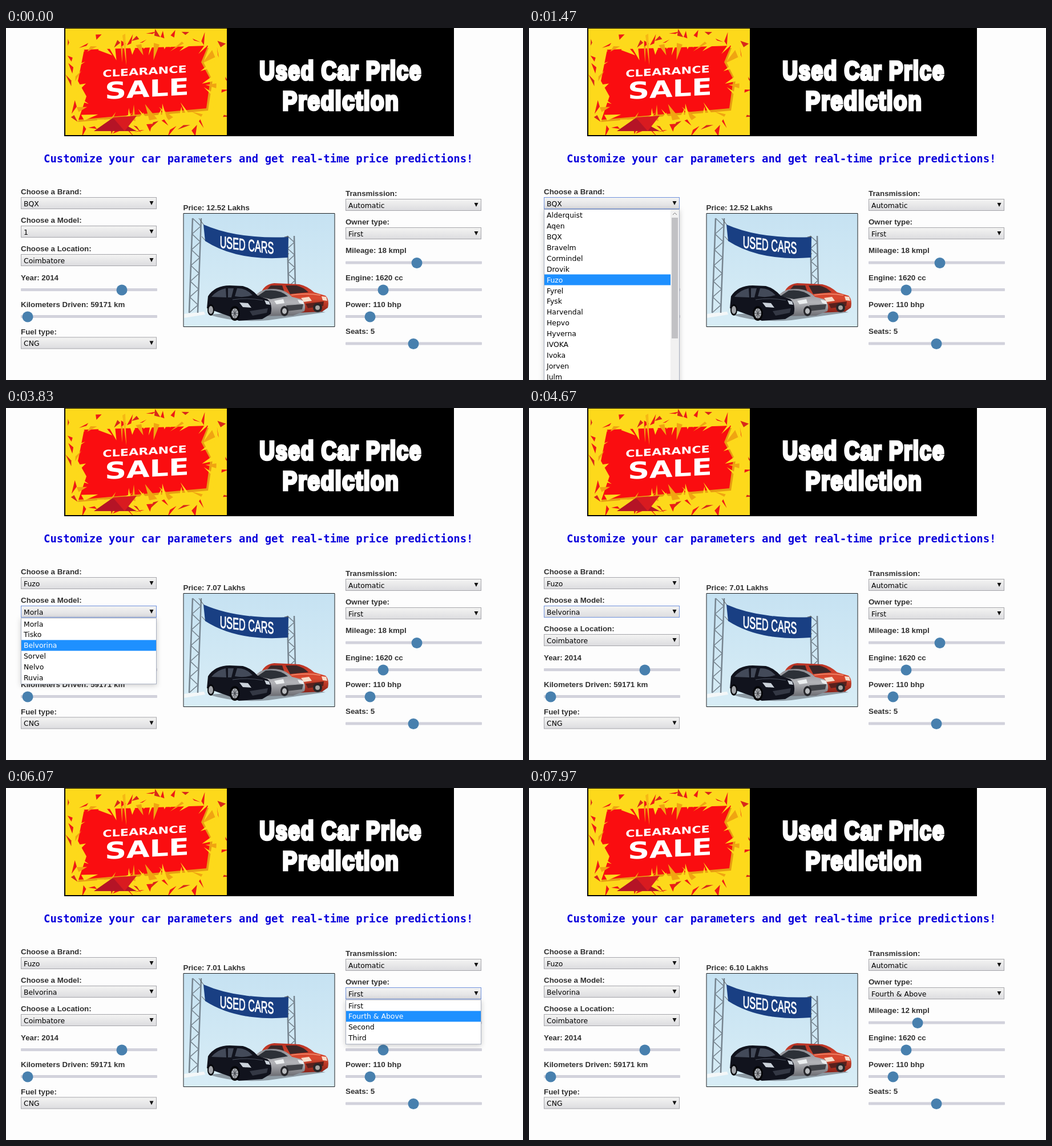
Animation, 906 px wide and 618 px high, one loop 8000 ms. Source, as an HTML page:

```html
<!DOCTYPE html>
<html lang="en">
<head>
<meta charset="utf-8">
<title>Used Car Price Prediction</title>
<style>
  html, body { margin: 0; width: 100%; height: 100%; overflow: hidden; background: #fdfdfd; }
  svg { display: block; width: 906px; height: 618px; }
  .label { font: bold 13.333px "Liberation Sans", Arial, sans-serif; fill: #303030; }
  .value { font: 12.4px "DejaVu Sans", sans-serif; fill: #000; }
  .lead { font: bold 18.96px "DejaVu Sans Mono", monospace; fill: #0a00dc; }
  .title { font: bold 47px "Liberation Sans", Arial, sans-serif; letter-spacing: 2px; fill: #fff; stroke: #fff; stroke-width: 4.5; text-anchor: middle; }
  .promo { font-family: "DejaVu Sans", sans-serif; font-weight: bold; fill: #fff; text-anchor: middle; }
  .sign { font: 29px "Liberation Sans", Arial, sans-serif; fill: #fff; stroke: #fff; text-anchor: middle; }
  .popup { filter: drop-shadow(0 2px 5px #0003); }
  .truss { fill: none; stroke: #76848f; stroke-width: 2.5; }
</style>
</head>
<body>
<svg viewBox="0 0 906 618">
  <defs>
    <linearGradient id="button" x2="0" y2="1">
      <stop stop-color="#f4f4f3"/><stop offset="1" stop-color="#dcdcdf"/>
    </linearGradient>
    <linearGradient id="sky" x2="0" y2="1">
      <stop stop-color="#c6e2f2"/><stop offset="1" stop-color="#d8edf6"/>
    </linearGradient>
    <linearGradient id="silver" x2="0" y2="1">
      <stop stop-color="#8b8c92"/><stop offset=".5" stop-color="#b4b5b9"/><stop offset="1" stop-color="#6b6c72"/>
    </linearGradient>
    <linearGradient id="red" x2="0" y2="1">
      <stop stop-color="#b83325"/><stop offset=".5" stop-color="#da4a30"/><stop offset="1" stop-color="#8a2118"/>
    </linearGradient>
    <clipPath id="promoClip"><path d="M104 1H387V188H104Z"/></clipPath>
  </defs>
  <rect width="906" height="618" fill="#fdfdfd"/>

  <path d="M102 0H785V190H102Z"/>
  <g clip-path="url(#promoClip)">
    <path d="M104 1H387V188H104Z" fill="#fdd91b"/>
    <path d="M140 41L355 35L346 60L362 92L354 145L126 165L143 122L128 95Z" fill="#e79c12"/>
    <path d="M137 38L354 31L342 60L358 90L351 141L127 161L141 120L126 93Z" fill="#fa0d10"/>
    <g id="shards" transform="rotate(-3 245 95)"></g>
    <path d="M154 181L187 158L229 181Z" fill="#b51426"/>
    <path d="M187 157L229 154L208 181Z" fill="#d91b20"/>
    <path d="M204 13L209 10L211 66Z" fill="#f6b814"/>
    <text class="promo" font-size="17" transform="matrix(1.31 -.075 0 1 243 82)">CLEARANCE</text>
    <text class="promo" font-size="41" transform="matrix(1.28 -.07 0 1 247 121)">SALE</text>
  </g>
  <g class="title">
    <text transform="translate(586.500 91) scale(.785 1)">Used Car Price</text>
    <text transform="translate(587 144) scale(.82 1)">Prediction</text>
  </g>
  <text class="lead" x="66" y="236">Customize your car parameters and get real-time price predictions!</text>

  <g>
    <path d="M311 325.500H576V524.500H311Z" fill="url(#sky)"/>
    <path d="M312 502L347 498L349 503L312 509Z" fill="#f4f7f8"/>
    <path d="M355 503Q400 518 460 513L560 499L520 492Z" fill="#8d9aa3"/>
    <g id="trusses" class="truss"></g>
    <path d="M338 334L349 349M343 366L350 374M488 367L495 366M488 400L496 396" stroke="#555" fill="none"/>
    <path d="M346 345Q405 371 495 367L494 403Q405 410 349 374Z" fill="#193f83"/>
    <text class="sign" transform="matrix(.56 .065 0 1 422 391)">USED CARS</text>

    <path d="M446 468Q451 450 470 448L514 450Q528 453 540 464L560 470Q567 477 564 491L554 498L505 500L450 492Z" fill="url(#red)"/>
    <path d="M454 463L464 452H484L488 464ZM490 452H509Q521 455 530 464L498 467Z" fill="#3b2728"/>
    <path d="M517 474L531 472L536 479L522 481ZM553 471L561 472L563 479L555 478Z" fill="#f6dcca"/>
    <path d="M525 484L557 480L556 488L529 492Z" fill="#5a201c"/>
    <path d="M500 469Q525 465 551 469" stroke="#f08062" stroke-width="2" fill="none"/>
    <ellipse cx="546" cy="491" rx="8" ry="8" fill="#292729"/>
    <ellipse cx="546" cy="491" rx="4" ry="4" fill="#a9a5a3"/>

    <path d="M436 471Q447 457 468 458Q489 458 501 472L517 476Q527 484 523 497L503 505L440 506Z" fill="url(#silver)"/>
    <path d="M440 471L455 461Q480 458 494 471L464 476Z" fill="#2c3037"/>
    <path d="M470 479L486 476L488 483L474 485ZM511 477L521 479L522 485L514 483Z" fill="#eceff0"/>
    <path d="M491 487L521 485L519 494L493 497Z" fill="#424449"/>
    <ellipse cx="488" cy="497" rx="7" ry="9" fill="#27282c"/>
    <ellipse cx="488" cy="497" rx="4" ry="5" fill="#b8bbbe"/>

    <path d="M352 492L354 471Q366 452 392 452L415 453Q430 457 441 470L458 476Q468 484 464 502L449 511L408 514L391 506Z" fill="#11131d"/>
    <path d="M360 472Q370 460 385 457L386 473ZM389 457L399 457L395 473L389 473ZM401 471L405 457Q420 456 432 469Q417 474 401 471Z" fill="#434a59"/>
    <path d="M409 482L424 483L430 491L415 490ZM453 478L461 480L463 486L456 485Z" fill="#cbd2da"/>
    <path d="M427 497L459 492L457 500L432 505Z" fill="#343844"/>
    <path d="M397 477Q422 473 450 478" stroke="#4c5361" fill="none"/>
    <ellipse cx="359" cy="495" rx="6" ry="10" fill="#050609"/>
    <ellipse cx="359" cy="495" rx="4" ry="7" fill="#a2a5aa"/>
    <ellipse cx="401" cy="501" rx="9" ry="13" fill="#050609"/>
    <ellipse cx="401" cy="501" rx="6" ry="9" fill="#b1b4b8"/>
    <path d="M401 492V510M395 501H407M397 495L405 507M405 495L397 507" stroke="#3b3d42"/>
    <path d="M311 325.500H576V524.500H311Z" fill="none" stroke="#1c2023"/>
  </g>
  <g id="form"></g>
</svg>
<script>
const LOOP = 8000;
const LEFT = 26, RIGHT = 595, WIDTH = 238, ROW = 18.93;
const BRANDS = ["Alderquist", "Aqen", "BQX", "Bravelm", "Cormindel", "Drovik", "Fuzo", "Fyrel", "Fysk",
  "Harvendal", "Hepvo", "Hyverna", "IVOKA", "Ivoka", "Jorven", "Julm"];
const MODELS = ["Morla", "Tisko", "Belvorina", "Sorvel", "Nelvo", "Ruvia"];
const OWNERS = ["First", "Fourth &amp; Above", "Second", "Third"];

// Opening and closing times of the three menus, then the slider drag.
const BRAND = [1000, 1900], MODEL = [3250, 4150], OWNER = [5600, 6450], DRAG = [7050, 7700];

const $ = id => document.getElementById(id);
const clamp = v => Math.min(1, Math.max(0, v));
const progress = (t, [from, to]) => clamp((t - from) / (to - from));
const isOpen = (t, [from, to]) => t >= from && t < to;

const text = (x, y, s, kind, fill = "") =>
  `<text class="${kind}" x="${x}" y="${y}"${fill && ` style="fill:${fill}"`}>${s}</text>`;
const rect = (x, y, w, h, attrs) => `<rect x="${x}" y="${y}" width="${w}" height="${h}" ${attrs}/>`;

function select(x, y, label, value, focused) {
  return text(x, y - 5, label, "label") +
    rect(x + .5, y + .5, WIDTH - 1, 20, `fill="url(#button)" stroke="${focused ? "#6f91dc" : "#a5a5aa"}"`) +
    text(x + 5, y + 15.5, value, "value") +
    `<path d="M${x + 225.500} ${y + 7}h7l-3.500 7z" fill="#111"/>`;
}

function slider(x, y, label, thumb) {
  return text(x, y - 17, label, "label") +
    rect(x, y - 2.5, 239, 5, 'rx="1" fill="#d2d2dc"') +
    `<circle cx="${thumb}" cy="${y + .5}" r="9.5" fill="#4880ae"/>`;
}

function popup(x, y, items, active, scrolls) {
  const rowWidth = WIDTH - (scrolls ? 17 : 2);
  const height = items.length * ROW + 2;
  let out = rect(x + .5, y + .5, WIDTH - 1, height, 'class="popup" fill="#fff" stroke="#a9b0c0"');
  items.forEach((item, i) => {
    const top = y + 1 + i * ROW;
    if (i === active) out += rect(x + 1, top, rowWidth, ROW, 'fill="#1e90ff"');
    out += text(x + 5, top + 14, item, "value", i === active ? "#fff" : "");
  });
  if (scrolls) {
    out += rect(x + 222, y + 1, 15, height, 'fill="#f1f1f1"') +
      rect(x + 224, y + 15, 11, 212, 'fill="#c1c1c4"') +
      `<path d="M${x + 226} ${y + 10}l3.500-3.500 3.500 3.500" fill="none" stroke="#777"/>`;
  }
  return out;
}

function hovered(t, [from], start, end) {
  return Math.round(start + (end - start) * progress(t, [from + 150, from + 420]));
}

function priceAt(t, mileage) {
  if (t < BRAND[1] + 150) return 12.52;
  if (t < MODEL[1] + 150) return 7.07;
  if (t < OWNER[1] + 150) return 7.01;
  return 6.10 + (mileage - 12) * .04;
}

function formAt(t) {
  const brandChosen = t >= BRAND[1], modelChosen = t >= MODEL[1];
  const drag = progress(t, DRAG);
  const mileage = Math.round(18 - 6 * drag * drag * (3 - 2 * drag));
  const model = modelChosen ? MODELS[2] : brandChosen ? MODELS[0] : "1";

  let out = select(LEFT, 297, "Choose a Brand:", BRANDS[brandChosen ? 6 : 2], isOpen(t, [BRAND[0], MODEL[0]])) +
    select(LEFT, 347, "Choose a Model:", model, isOpen(t, [MODEL[0], OWNER[0]])) +
    select(LEFT, 397, "Choose a Location:", "Coimbatore") +
    slider(LEFT, 459.5, "Year: 2014", 203) +
    slider(LEFT, 506.5, "Kilometers Driven: 59171 km", 38) +
    select(LEFT, 542.5, "Fuel type:", "CNG") +
    select(RIGHT, 300, "Transmission:", "Automatic") +
    select(RIGHT, 350, "Owner type:", OWNERS[t < OWNER[1] ? 0 : 1], isOpen(t, [OWNER[0], DRAG[0]])) +
    slider(RIGHT, 412, `Mileage: ${mileage} kmpl`, 720 - (18 - mileage) * 6.5) +
    slider(RIGHT, 459.5, "Engine: 1620 cc", 661) +
    slider(RIGHT, 506.5, "Power: 110 bhp", 638) +
    slider(RIGHT, 554, "Seats: 5", 714) +
    text(310.5, 320, `Price: ${priceAt(t, mileage).toFixed(2)} Lakhs`, "label");

  if (isOpen(t, BRAND)) out += popup(LEFT, 318, BRANDS, hovered(t, BRAND, 2, 6), true);
  if (isOpen(t, MODEL)) out += popup(LEFT, 368.5, MODELS, hovered(t, MODEL, 0, 2));
  if (isOpen(t, OWNER)) out += popup(RIGHT, 371.5, OWNERS, hovered(t, OWNER, 0, 1));
  return out;
}

// Slanted splinters: yellow ones cut into the red panel, red ones fly off it.
function shards() {
  let seed = 11, out = "";
  const random = () => (seed = seed * 16807 % 2147483647) / 2147483647;
  const count = 84;
  for (let i = 0; i < count; i++) {
    const angle = (i + random()) / count * Math.PI * 2;
    const c = Math.cos(angle), s = Math.sin(angle);
    const edge = (Math.abs(c / 115) ** 6 + Math.abs(s / 62) ** 6) ** (-1 / 6);
    const inward = i % 2;
    const base = edge * (inward ? 1.07 : 1.08 + random() * .3);
    const tip = base + (inward ? -8 - random() * 22 : 3 + random() * 12);
    const half = 2 + random() * 5, lean = random() * 32 - 16;
    const color = inward ? (i % 6 === 1 ? "#f0a412" : "#fdd91b") : (i % 3 ? "#ef1a16" : "#d8281a");
    const point = (r, side) => `${(245 + c * r - s * side).toFixed(1)} ${(95 + s * r + c * side).toFixed(1)}`;
    out += `<path d="M${point(base, -half)}L${point(base, half)}L${point(tip, lean)}Z" fill="${color}"/>`;
  }
  return out;
}

function truss(x1, x2, top, bottom, lean, steps) {
  const at = (side, k) => `${(side ? x2 : x1) + lean * k / steps} ${top + (bottom - top) * k / steps}`;
  let zigzag = "";
  for (let k = 0; k <= steps; k++) zigzag += (k ? "L" : "M") + at(k % 2, k);
  return `<path d="M${at(0, 0)}L${at(0, steps)}M${at(1, 0)}L${at(1, steps)}"/>` +
    `<path d="${zigzag}" stroke-width="1.500"/>`;
}

$("shards").innerHTML = shards();
$("trusses").innerHTML = truss(327, 342, 334, 500, -6, 12) + truss(493, 505, 365, 454, 2, 8);

let shown = "";
function draw(now) {
  const form = formAt(now % LOOP);
  if (form !== shown) $("form").innerHTML = shown = form;
  requestAnimationFrame(draw);
}
draw(0);
</script>
</body>
</html>
```
